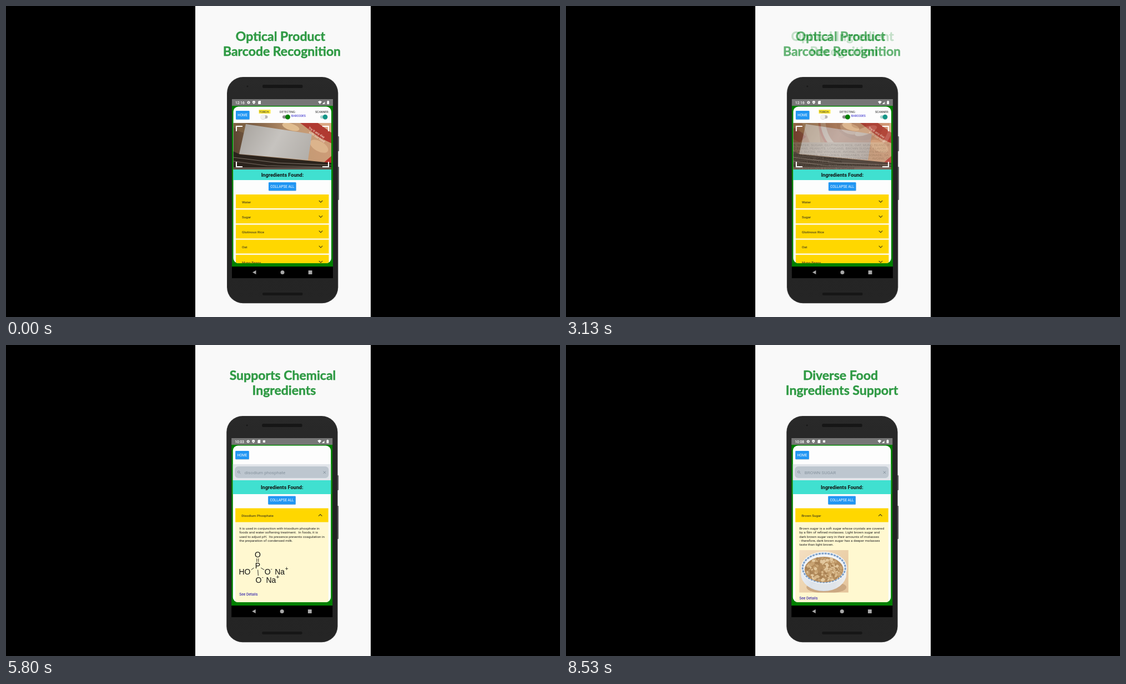
Write an HTML page with a canvas that moves like this. It is 998 by 561 pixels and loops after 9.01 s.

```html
<!DOCTYPE html>
<html lang="en">
<head>
<meta charset="utf-8">
<title>App features</title>
<style>
html, body { margin: 0; width: 100%; height: 100%; overflow: hidden; background: #000; }
canvas { display: block; width: 998px; height: 561px; }
</style>
</head>
<body>
<canvas id="stage" width="998" height="561"></canvas>
<script>
const W = 998, H = 561, LOOP = 9010, FADE = 500;
const UI = 'Roboto, sans-serif', LABEL = '"Liberation Sans", Arial, sans-serif';
const BLUE = '#2196f3', GOLD = '#ffd700', TURQUOISE = '#40e0d0', GREEN = '#008000';
let c;

function rect(x, y, w, h, fill, r = 0) {
  c.fillStyle = fill;
  c.beginPath();
  c.roundRect(x, y, w, h, r);
  c.fill();
}

function ellipse(x, y, rx, ry, fill, turn = 0) {
  c.fillStyle = fill;
  c.beginPath();
  c.ellipse(x, y, rx, ry, turn, 0, Math.PI * 2);
  c.fill();
}

const disc = (x, y, r, fill) => ellipse(x, y, r, r, fill);

function trace(pts) {
  c.beginPath();
  pts.forEach(([x, y]) => c.lineTo(x, y));
}

function poly(fill, ...pts) {
  trace(pts);
  c.fillStyle = fill;
  c.fill();
}

function line(color, width, ...pts) {
  trace(pts);
  c.strokeStyle = color;
  c.lineWidth = width;
  c.stroke();
}

function text(str, x, y, size, color, { align = 'left', weight = 400, family = UI } = {}) {
  c.font = `${weight} ${size}px ${family}`;
  c.textAlign = align;
  c.fillStyle = color;
  c.fillText(str, x, y);
}

function blend(x0, y0, x1, y1, ...colors) {
  const g = c.createLinearGradient(x0, y0, x1, y1);
  colors.forEach((col, i) => g.addColorStop(i / (colors.length - 1), col));
  return g;
}

function clipped(x, y, w, h, r, draw) {
  c.save();
  c.beginPath();
  c.roundRect(x, y, w, h, r);
  c.clip();
  draw();
  c.restore();
}

function random(seed) {
  return () => (seed = (seed * 16807) % 2147483647) / 2147483647;
}

function title(rows) {
  const color = '#2f9a44';
  rows.forEach(([str, x], i) => {
    const y = 63 + i * 27.3;
    text(str, x, y, 23, color, { align: 'center', weight: 700, family: 'Lato, sans-serif' });
    c.strokeStyle = color;
    c.lineWidth = 0.5;
    c.strokeText(str, x, y);
  });
}

function statusBar(clock, extra) {
  rect(407, 168, 182, 12, '#767676');
  text(clock, 413, 176.6, 6.6, '#fff', { weight: 500 });
  disc(437, 174, 2.5, '#fff');
  disc(437, 174, 0.9, '#767676');
  poly('#fff', [444, 171.7], [446.5, 171], [449, 171.7], [448.7, 175], [446.5, 177], [444.3, 175]);
  disc(446.5, 174, 0.8, '#767676');
  poly('#fff', [454.2, 172.4], [455.6, 171], [459, 171], [459, 177], [454.2, 177]);
  if (extra) rect(463.6, 171.8, 4.2, 4.2, '#eee');
  poly('#fff', [562, 172.6], [565.5, 171], [569, 172.6], [565.5, 177]);
  poly('#bbb', [570, 177], [575, 172], [575, 177]);
  poly('#fff', [570, 177], [573.4, 173.6], [573.4, 177]);
  rect(578.3, 171.6, 3.8, 5.6, '#fff', 0.5);
  rect(579.3, 170.8, 1.8, 1, '#fff');
}

function navBar() {
  rect(407, 470, 182, 21, '#000');
  poly('#a8a8a8', [444, 480.4], [450.5, 476.8], [450.5, 484]);
  disc(498, 480.4, 3.5, '#a8a8a8');
  rect(544.7, 477.1, 6.8, 6.8, '#a8a8a8', 0.5);
}

function phone(clock, extra, screen) {
  rect(597, 235, 3, 27, '#6c6c6c', 1);
  rect(597, 290, 3, 60, '#6c6c6c', 1);
  rect(398, 128, 200.3, 408.3, '#333', 29);
  rect(399, 129, 198.3, 406.3, blend(0, 129, 0, 536, '#292929', '#222', '#252525'), 28);
  rect(462, 142, 72.5, 6, '#161616', 2);
  rect(462, 517, 72.5, 5, '#161616', 2);
  disc(435, 145, 1.4, '#191919');
  rect(407, 180, 182, 290, GREEN);
  statusBar(clock, extra);
  navBar();
  clipped(409.5, 181.5, 176.5, 282.5, 9, () => {
    rect(409, 181, 178, 284, '#fdfdfd');
    screen();
  });
}

function button(str, x, y, w, h) {
  rect(x + 0.3, y + 0.8, w, h, '#b9c4cc', 1);
  rect(x, y, w, h, BLUE, 1);
  text(str, x + w / 2, y + h / 2 + 2.3, 6.3, '#fff', { align: 'center' });
}

function foundBar(y, h) {
  rect(409, y, 178, h, TURQUOISE);
  text('Ingredients Found:', 498, y + h / 2 + 3.2, 9.1, '#111', { align: 'center', weight: 700 });
}

function row(str, y, open) {
  const d = open ? -1.6 : 1.6, m = y + 12.6;
  rect(414, y, 167.5, 25, GOLD);
  text(str, 425, y + 15.7, 6.2, '#4d451c', { weight: 500 });
  line('#4d451c', 1.2, [563.8, m - d], [567, m + d], [570.2, m - d]);
}

function toggle(x, track, thumb, thumbX) {
  rect(x, 197.2, 11.5, 5.8, track, 2.9);
  disc(thumbX, 200.6, 4.5, 'rgba(0,0,0,.18)');
  disc(thumbX, 200.1, 4.3, thumb);
}

function corners() {
  for (const [x, dx] of [[415, 11], [581, -11]])
    for (const [y, dy] of [[217, 9], [290, -9]])
      line('#fff', 2, [x + dx, y], [x, y], [x, y + dy]);
}

function scanner(photo) {
  button('HOME', 414, 189, 24.5, 15.5);
  rect(455.5, 187, 21, 7, '#ffeb3b');
  text('TORCH:', 456.3, 192.5, 5.2, '#222');
  text('DETECTING:', 493, 192.5, 5.2, '#222');
  text('SCANNER:', 557, 192.5, 5.2, '#222');
  text('BARCODES', 514, 199.8, 5.1, '#1a10c8');
  toggle(460, '#b5b5b5', '#f1f1f1', 463);
  toggle(498, '#8a8a8a', GREEN, 507.6);
  toggle(566, '#a9d8d3', '#149688', 575);
  clipped(409.5, 211, 176.5, 84, 0, photo);
  corners();
  foundBar(295, 19);
  button('COLLAPSE ALL', 473, 318, 49.5, 15);
  ['Water', 'Sugar', 'Glutinous Rice', 'Oat', 'Mung Beans']
    .forEach((name, i) => row(name, 340 + i * 27.2));
}

function packPhoto() {
  rect(409, 211, 178, 85, blend(410, 255, 586, 225, '#5a4331', '#8d6c4e', '#c39a74', '#cf9c78'));
  ellipse(430, 220, 22, 9, '#7d6143', 0.3);
  ellipse(513, 218, 16, 6, '#e0bd90', 0.3);
  ellipse(564, 253, 18, 9, '#dcb48c', 0.5);
  poly('#b03a31', [530, 211], [562, 211], [587, 229], [587, 248], [566, 238]);
  poly('#dba884', [562, 211], [587, 211], [587, 229]);
  c.save();
  c.translate(540, 218);
  c.rotate(0.57);
  text('Try it any day', 5, 0, 5.6, '#f0cdbd', { weight: 700 });
  text('with our food', 10, 6.4, 5.6, '#f0cdbd', { weight: 700 });
  c.restore();
  poly('#b8322c', [573, 282], [587, 270], [587, 286]);
  poly('#2b231c', [409, 262], [422, 268], [545, 279], [587, 283], [587, 296], [409, 296]);
  line('#7c7066', 1, [409, 273], [490, 283], [587, 287]);
  line('#5e534a', 1.5, [409, 280], [470, 288], [587, 291]);
  rect(409, 291, 178, 5, '#5d5148');
  poly(blend(430, 215, 540, 278, '#aaa6a1', '#c6c3bf', '#b3afaa'),
    [432, 213], [551, 231], [544, 278], [420, 267]);
}

function labelPhoto() {
  rect(409, 211, 178, 85, blend(410, 220, 586, 235, '#b9643c', '#cf8a61', '#b67662', '#9f6459'));
  poly('#a52b20', [409, 222], [415, 219], [433, 236], [421, 246], [409, 239]);
  poly('#e2b183', [426, 211], [455, 211], [459, 247], [440, 247]);
  disc(525, 207, 70, '#c64c3e');
  disc(525, 207, 66, '#ead0bf');
  disc(526, 207, 58, '#b86b50');
  ellipse(530, 215, 42, 27, '#a15a45', 0.1);
  ellipse(512, 221, 18, 10, '#d4a38d', 0.3);
  ellipse(541, 225, 21, 7, '#e3c0ac', -0.35);
  ellipse(528, 214, 13, 7, '#8d4937');
  poly(blend(410, 270, 586, 285, '#c5ad99', '#c9b6a8', '#c79f91'),
    [409, 246], [587, 246], [587, 296], [409, 296]);
  const o = { family: LABEL };
  [
    'S: WATER, SUGAR, GLUTINOUS RICE, OAT, MUNG BEANS, R',
    'D BEANS, PEANUTS, LONGANS, BROWN SUGAR, FLAVOR',
    ': EAU, SUCRE, RIZ VISQUEUX, AVOINE, HARICOTS MUNGO,',
    'COTS ROUGES, ARACHIDES, LONGANES, CASSONADE, SA',
    'FORMATION : OAT, BARLEY, PEANUT CONTENU : AVOINE, O',
    ' TAIWAN PRODUIT DE TAIWAN',
    'ED BY/FABRIQUE PAR: VELMORA ENTERPRISE CO.,LTD',
    ' NO.2 ASHGROVE E ROAD, NORTHAM'
  ].forEach((s, i) => text(s, 410, 253.3 + i * 6, 6, '#4a3c35', o));
}

function details(query, name, rows, linkY, figure) {
  button('HOME', 414, 191, 24.5, 15);
  rect(409, 215, 178, 29, '#e1e5ea');
  rect(413, 219, 169, 21, '#bdc6cf', 6);
  c.strokeStyle = '#86939e';
  c.lineWidth = 1;
  c.beginPath();
  c.arc(420, 229, 1.8, 0, 7);
  c.stroke();
  line('#86939e', 1, [421.4, 230.4], [423.4, 232.4]);
  line('#86939e', 1, [572.4, 227.6], [576.8, 232]);
  line('#86939e', 1, [576.8, 227.6], [572.4, 232]);
  text(query, 430.6, 232.6, 8.1, '#86939e');
  foundBar(244, 25);
  button('COLLAPSE ALL', 473, 272.5, 49.5, 15);
  rect(414, 319, 167.5, 146, '#fff8d0');
  row(name, 294.5, true);
  rows.forEach((s, i) => text(s, 421, 333.2 + i * 7.2, 6.25, '#222'));
  figure();
  text('See Details', 421, linkY, 6.7, '#1608a8');
}

function molecule() {
  const atom = (s, x, y, size = 14) => text(s, x, y, size, '#111', { family: LABEL });
  const bond = (...pts) => line('#111', 0.9, ...pts);
  atom('O', 448.7, 383);
  atom('P', 449.5, 403.3);
  atom('HO', 420.2, 413.6);
  atom('O', 466.5, 413.6);
  atom('Na', 485, 413.6);
  atom('O', 450.4, 428.6);
  atom('Na', 469.3, 428.6);
  atom('-', 477.6, 407, 9);
  atom('+', 503.5, 407, 10);
  atom('-', 461.6, 422, 9);
  atom('+', 487.4, 422, 10);
  bond([452.6, 385], [452.6, 391.5]);
  bond([455.6, 385], [455.6, 391.5]);
  bond([442.5, 405.5], [447.5, 402]);
  bond([460, 402], [466, 405.5]);
  bond([454.5, 405.5], [455.2, 416]);
}

function bowl() {
  clipped(421, 370, 88.5, 76.5, 0, () => {
    rect(420, 369, 91, 79, blend(421, 370, 509, 446, '#f4dfc2', '#ecd2ac', '#e4c49b'));
    ellipse(470, 437, 36, 11, '#cba882');
    ellipse(465, 413, 41, 31, blend(425, 410, 507, 420, '#e9edf2', '#cfd7e2', '#f0f0ee'));
    ellipse(465, 435, 21, 8, '#dfe4ea');
    ellipse(465.5, 402, 41.5, 29, '#f1f4f7');
    c.setLineDash([4, 1.5]);
    c.strokeStyle = '#7d9fc8';
    c.lineWidth = 3;
    c.beginPath();
    c.ellipse(465.5, 402, 38.5, 26, 0, 0, 7);
    c.stroke();
    c.setLineDash([]);
    ellipse(465.5, 405, 35, 23, '#b58d5d');
    const rnd = random(41), tones = ['#d9b98b', '#c9a473', '#a98254', '#e3c89e'];
    for (let i = 0; i < 170; i++) {
      const a = rnd() * Math.PI * 2, d = Math.sqrt(rnd());
      ellipse(465.5 + Math.cos(a) * d * 32, 404.5 + Math.sin(a) * d * 21,
        1.5 + rnd() * 2.5, 1 + rnd() * 2, tones[i % 4], rnd() * 3);
    }
  });
}

// Later scenes sit slightly further left than the first.
const scenes = [
  { at: 0, dx: 0, clock: '12:16', rows: [['Optical Product', 494.5], ['Barcode Recognition', 497]],
    screen: () => scanner(packPhoto) },
  { at: 3000, dx: -0.6, clock: '11:19', rows: [['Optical Ingredient', 498], ['Recognition', 500.5]],
    screen: () => scanner(labelPhoto) },
  { at: 5000, dx: -0.8, clock: '10:03', extra: true,
    rows: [['Supports Chemical', 498.5], ['Ingredients', 501]],
    screen: () => details('disodium phosphate', 'Disodium Phosphate', [
      'It is used in conjunction with trisodium phosphate in',
      'foods and water softening treatment.  In foods, it is',
      'used to adjust pH.  Its presence prevents coagulation in',
      'the preparation of condensed milk.'
    ], 452, molecule) },
  { at: 6000, dx: -0.8, clock: '10:08', extra: true,
    rows: [['Diverse Food', 494.5], ['Ingredients Support', 497]],
    screen: () => details('BROWN SUGAR', 'Brown Sugar', [
      'Brown sugar is a soft sugar whose crystals are covered',
      'by a film of refined molasses. Light brown sugar and',
      'dark brown sugar vary in their amounts of molasses',
      '- therefore, dark brown sugar has a deeper molasses',
      'taste than light brown.'
    ], 459, bowl) }
];

function render(scene) {
  const layer = document.createElement('canvas');
  layer.width = W;
  layer.height = H;
  c = layer.getContext('2d');
  rect(0, 0, W, H, '#000');
  rect(341, 0, 316, H, '#f9f9f9');
  title(scene.rows);
  c.translate(scene.dx, 0);
  phone(scene.clock, scene.extra, scene.screen);
  return layer;
}

const layers = scenes.map(render);
const out = document.getElementById('stage').getContext('2d');
const start = performance.now();

function frame() {
  const t = (performance.now() - start) % LOOP;
  const i = scenes.findLastIndex(s => s.at <= t);
  const p = i ? Math.min(1, (t - scenes[i].at) / FADE) : 1;
  if (p < 1) out.drawImage(layers[i - 1], 0, 0);
  out.globalAlpha = p;
  out.drawImage(layers[i], 0, 0);
  out.globalAlpha = 1;
  requestAnimationFrame(frame);
}
frame();
</script>
</body>
</html>
```
